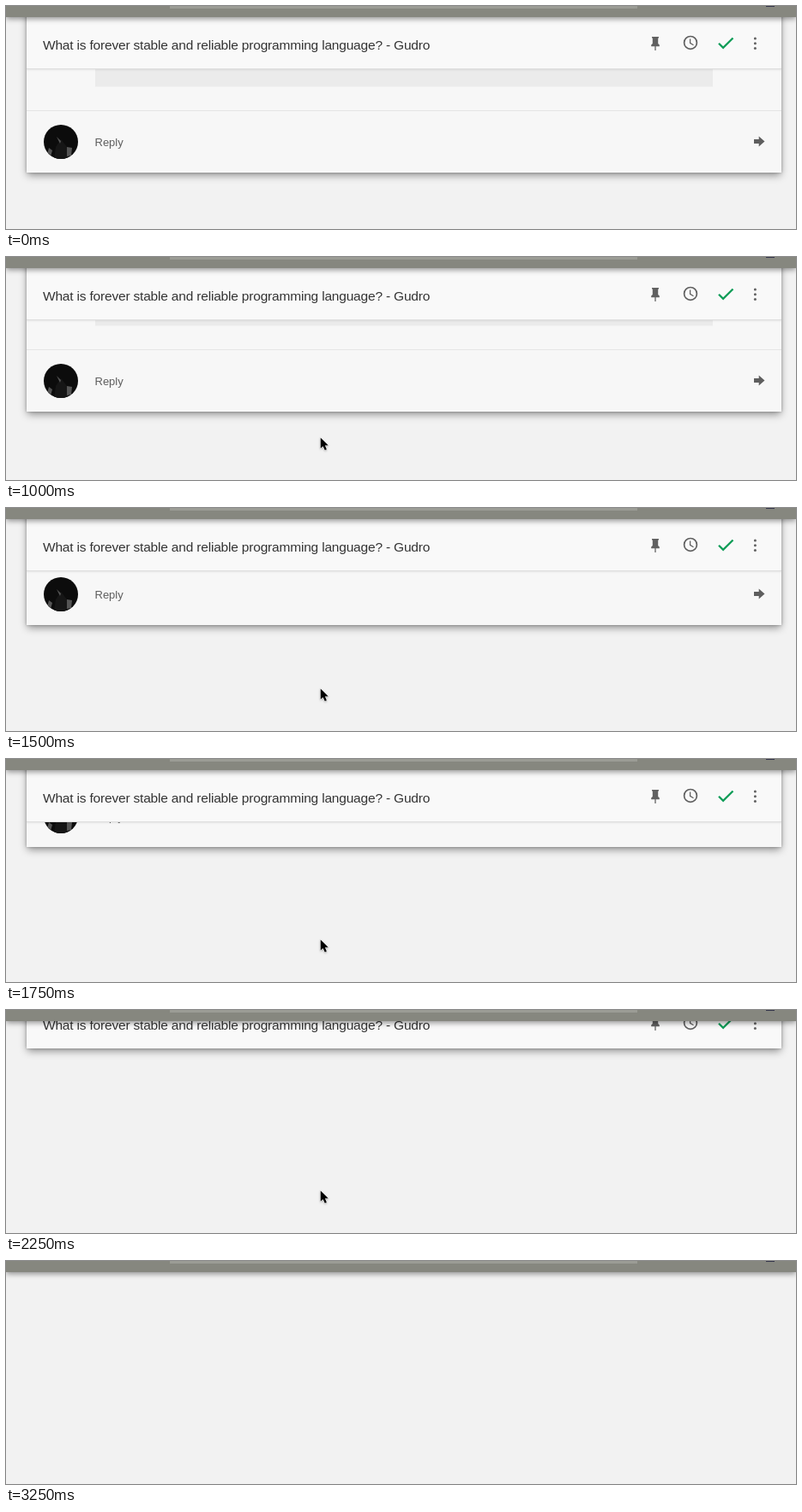
Animation of 921x261 px, one loop 4 s. Source, as an HTML page:

```html
<!DOCTYPE html>
<html lang="en">
<head>
<meta charset="utf-8">
<title>Card scroll</title>
<style>
  html, body { margin: 0; width: 100%; height: 100%; overflow: hidden; background: #f2f2f2; }
  body { position: relative; font-family: "Liberation Sans", Arial, sans-serif; }
  svg { position: absolute; left: 0; top: 0; display: block; }
  #card {
    position: absolute; left: 24px; top: 0; width: 880px; height: 195px;
    overflow: hidden; background: #f7f7f7;
    box-shadow: 0 4px 9px -1px rgba(0,0,0,.42), 0 0 3px rgba(0,0,0,.25);
  }
  #header {
    position: absolute; left: 0; top: 0; width: 880px; height: 73px;
    background: #f9f9f9; border-bottom: 1px solid #dedede;
    box-shadow: 0 1px 2px rgba(0,0,0,.08);
  }
  #toolbar {
    position: absolute; left: 0; top: 0; width: 100%; height: 13px;
    background: #86877f; box-shadow: 0 2px 6px rgba(0,0,0,.42);
  }
  #toolbar i { position: absolute; top: 0; }
  #field { left: 191px; width: 545px; height: 3px; background: #9b9c95; }
  #mark { left: 886px; width: 10px; height: 1px; background: #34354a; }
  #cursor { filter: drop-shadow(0 1px 1px rgba(0,0,0,.25)); }
  .title { font-size: 15.500px; letter-spacing: -.19px; fill: #333; }
  .reply { font-size: 13px; fill: #5e5e5e; }
</style>
</head>
<body>
<div id="card">
  <svg width="880" height="195" viewBox="24 0 880 195">
    <defs>
      <clipPath id="round"><circle cx="64" cy="159" r="20"/></clipPath>
    </defs>
    <path d="M104 0H824V94.500H104Z" fill="#ebebeb"/>
    <path d="M24 122.500H904" stroke="#e5e5e5"/>
    <g clip-path="url(#round)">
      <path d="M44 139h40v40H44Z" fill="#0c0c0c"/>
      <path d="M56 179l2-14 6-9 7 9 3 14Z" fill="#161616"/>
      <path d="M59 153l5 5-1 3Z" fill="#555"/>
      <path d="M50 166l4 3-2 7-4-2ZM71 165l6 1-1 9-5 1Z" fill="#555"/>
    </g>
    <text class="reply" x="103.500" y="164">Reply</text>
    <path d="M872 156h5.700v-3.500l6.800 6-6.800 6V161H872Z" fill="#5e5e5e"/>
  </svg>
  <div id="header">
    <svg width="880" height="73" viewBox="24 0 880 73">
      <text class="title" x="43" y="51">What is forever stable and reliable programming language? - Gudro</text>
      <g fill="#616161">
        <path transform="translate(747.400 34.400) scale(.8)"
              d="M16 12V4h1V2H7v2h1v8l-2 2v2h5.200v6h1.600v-6H18v-2l-2-2Z"/>
        <circle cx="873.400" cy="38" r="1.500"/>
        <circle cx="873.400" cy="43.700" r="1.500"/>
        <circle cx="873.400" cy="49.400" r="1.500"/>
      </g>
      <g fill="none" stroke="#616161" stroke-width="1.700">
        <circle cx="798" cy="42.900" r="7.400"/>
        <path d="M797.600 38.600v4.800l3.900 2.300" stroke-width="1.300"/>
      </g>
      <path d="M831 43.800l5.100 5.100L847.500 37.500" fill="none" stroke="#0f9d58" stroke-width="2.300"/>
    </svg>
  </div>
</div>
<div id="toolbar"><i id="field"></i><i id="mark"></i></div>
<svg id="cursor" width="13" height="18">
  <path d="M1.700 .5V13.100L4.600 10.400 6.700 15.100 8.900 14.200 6.900 9.600H10.800Z"
        stroke="#fff" stroke-width="1" paint-order="stroke"/>
</svg>
<script>
  const LOOP = 4000, STEP = 250;
  const SCROLL_START = 4, HEADER_STICK = 122;
  // Scroll offset at each screen update, starting at SCROLL_START
  const offsets = [14, 34, 58, 92, 128, 150, 173, 210];
  const card = document.getElementById("card");
  const header = document.getElementById("header");
  const cursor = document.getElementById("cursor");

  const moveTo = (el, x, y) => { el.style.transform = `translate(${x}px, ${y}px)`; };

  function draw() {
    const step = Math.floor(performance.now() % LOOP / STEP);
    const index = Math.min(step - SCROLL_START, offsets.length - 1);
    const scroll = index < 0 ? 0 : offsets[index];
    moveTo(card, 0, -scroll);
    moveTo(header, 0, Math.min(scroll, HEADER_STICK));

    cursor.style.visibility = step >= 1 && step < 13 ? "visible" : "hidden";
    if (step === 1) moveTo(cursor, 522, 149);
    else moveTo(cursor, 365, 211);
    requestAnimationFrame(draw);
  }
  draw();
</script>
</body>
</html>
```
